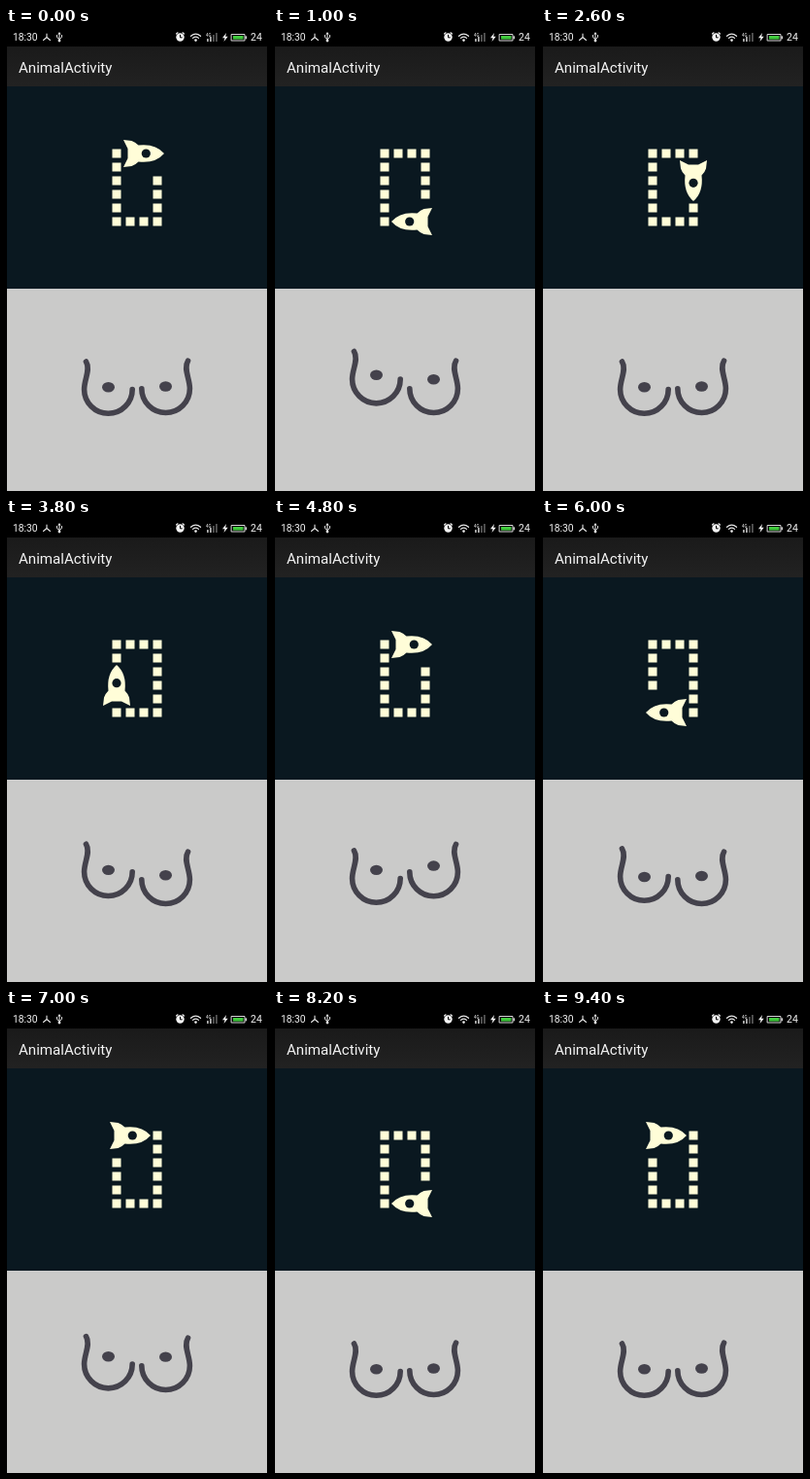
An HTML page with a canvas that plays this animation: 270x476 px, repeating every 9600 ms.

```html
<!DOCTYPE html>
<html lang="en">
<head>
<meta charset="utf-8">
<title>AnimalActivity</title>
<style>
html, body { margin: 0; width: 100%; height: 100%; overflow: hidden; background: #000; }
canvas { display: block; width: 270px; height: 476px; }
</style>
</head>
<body>
<canvas id="stage"></canvas>
<script>
const W = 270, H = 476, LOOP = 9600, STEP = 200;
const CREAM = '#fffdd8', NIGHT = '#0a1820', INK = '#44424c';
const canvas = document.getElementById('stage');
const ctx = canvas.getContext('2d');
const scale = window.devicePixelRatio || 1;
canvas.width = W * scale;
canvas.height = H * scale;

function rect(color, x, y, w, h) {
  ctx.fillStyle = color;
  ctx.fillRect(x, y, w, h);
}

function label(str, x, y, size) {
  ctx.fillStyle = '#f4f4f4';
  ctx.font = size + 'px Roboto, "Noto Sans", sans-serif';
  ctx.fillText(str, x, y);
}

function disc(color, x, y, rx, ry = rx) {
  ctx.fillStyle = color;
  ctx.beginPath();
  ctx.ellipse(x, y, rx, ry, 0, 0, Math.PI * 2);
  ctx.fill();
}

function stroke(path, color, width) {
  ctx.strokeStyle = color;
  ctx.lineWidth = width;
  ctx.lineCap = ctx.lineJoin = 'round';
  ctx.stroke(new Path2D(path));
}

function fill(path, color) {
  ctx.fillStyle = color;
  ctx.fill(new Path2D(path));
}

function statusBar() {
  label('18:30', 7, 13, 10.3);
  stroke('M42 6V9.5L38.5 12.5M42 9.5L45.5 12.5', '#e8e8e8', 1.1);
  stroke('M55 5.5V13M52.5 7.5V9.5L55 11.5L57.5 9.5V7.5', '#e8e8e8', 1);
  fill('M53.4 6.5L55 4L56.6 6.5Z', '#e8e8e8');
  disc('#e8e8e8', 55, 13, 1.4);

  disc('#f4f4f4', 179.5, 9.5, 4.2);
  stroke('M175.5 6L177 4.8M183.5 6L182 4.8', '#f4f4f4', 1.2);
  stroke('M179.5 7.3V9.8H181.3', '#000', 1);

  stroke('M190.5 8.3Q195.5 4 200.5 8.3M192.5 10.4Q195.5 7.8 198.5 10.4', '#e8e8e8', 1.2);
  disc('#e8e8e8', 195.5, 12.6, 1.3);

  label('4G', 206, 8.5, 4.5);
  for (let i = 0; i < 4; i++) {
    const h = 3 + i * 2;
    rect(i < 2 ? '#b0b0b0' : '#555', 207 + i * 3, 14 - h, 1.8, h);
  }

  fill('M227 5L223 10.2H225.5L224.5 14L228.7 8.7H226.2Z', '#f4f4f4');
  stroke('M232.5 6.5H246V13H232.5Z', '#d8d8d8', 1);
  rect('#d8d8d8', 246.5, 8.3, 1.6, 3);
  rect('#3fc83c', 234, 8, 10.5, 3.6);
  label('24', 252, 13, 10.5);
}

function chrome() {
  rect('#000', 0, 0, W, H);
  statusBar();
  const bar = ctx.createLinearGradient(0, 19, 0, 60);
  bar.addColorStop(0, '#1a1a1a');
  bar.addColorStop(1, '#222222');
  rect(bar, 1, 19, 268, 41);
  label('AnimalActivity', 13, 45.5, 15.1);
  rect(NIGHT, 1, 60, 268, 208);
  rect('#cacac9', 1, 268, 268, 208);
}

// Rocket track: 4 x 6 dots, rocket centres skip the corners.
const dotX = i => 114 + 14 * i;
const dotY = j => 129 + 14 * j;
const ROCKET = 'M-21 -14L-12.5 -13Q-9 -12 -5.5 -8.5Q12 -10.5 21 0Q12 10.5 -5.5 8.5' +
  'Q-9 12 -12.5 13L-21 14L-16.5 5V-5Z';

function rocketPose(n) {
  if (n < 2) return [dotX(1 + n), dotY(0), 0];
  if (n < 6) return [dotX(3), dotY(n - 1), 1];
  if (n < 8) return [dotX(8 - n), dotY(5), 2];
  return [dotX(0), dotY(12 - n), 3];
}

function rocketIndex(t) {
  const slip = t >= 2200 && t < 4400 ? 1 : 0;
  return (1 + t / STEP + slip) % 12;
}

function drawTrack(t) {
  const [cx, cy, turn] = rocketPose(rocketIndex(t));
  const [hw, hh] = turn % 2 ? [14, 21] : [21, 14];
  for (let i = 0; i < 4; i++) {
    for (let j = 0; j < 6; j++) {
      const edge = i === 0 || i === 3 || j === 0 || j === 5;
      const x = dotX(i), y = dotY(j);
      const hidden = Math.abs(x - cx) < hw + 4.5 && Math.abs(y - cy) < hh + 4.5;
      if (edge && !hidden) rect(CREAM, x - 4.5, y - 4.5, 9, 9);
    }
  }
  ctx.save();
  ctx.translate(cx, cy);
  ctx.rotate(turn * Math.PI / 2);
  fill(ROCKET, CREAM);
  disc(NIGHT, 2.3, 0, 4.6);
  ctx.restore();
}

// Each bounce: start time and how long the right spot floats.
const BOUNCES = [[250, 1950], [3300, 2450], [5800, 1900]];
const CURVE = 'M82.5 343C87.5 351 80.6 361 80.6 371.5A24.8 24.8 0 0 0 130.2 371.5';

function hop(t, start, length, height) {
  const p = (t - start) / length;
  return p > 0 && p < 1 ? -height * Math.sin(Math.PI * p) : 0;
}

function drawCurve(mirror, lift, spotLift) {
  ctx.save();
  if (mirror) {
    ctx.translate(W, -0.8);
    ctx.scale(-1, 1);
  }
  disc(INK, 105.5, 369.3 + spotLift, 6.5, 5.2);
  ctx.translate(0, lift);
  stroke(CURVE, INK, 5.6);
  ctx.restore();
}

function drawPair(t) {
  let left = 0, leftSpot = 0, right = 0, rightSpot = 0;
  for (const [s, float] of BOUNCES) {
    left += hop(t, s, 1600, 10.5);
    leftSpot += hop(t, s + 150, 1700, 14);
    right += hop(t, s + 900, 1400, 8);
    rightSpot += hop(t, s + 350, float, 12);
  }
  drawCurve(false, left, leftSpot);
  drawCurve(true, right, rightSpot);
}

function draw(now) {
  let t = Math.floor((now % LOOP) / STEP) * STEP;
  if (t > 1000 && t < 2200) t = 1000;
  ctx.setTransform(scale, 0, 0, scale, 0, 0);
  chrome();
  drawTrack(t);
  drawPair(t);
}

let begin;
function tick(now) {
  if (begin === undefined) begin = now;
  draw(Math.max(0, now - begin));
  requestAnimationFrame(tick);
}
draw(0);
requestAnimationFrame(tick);
</script>
</body>
</html>
```
